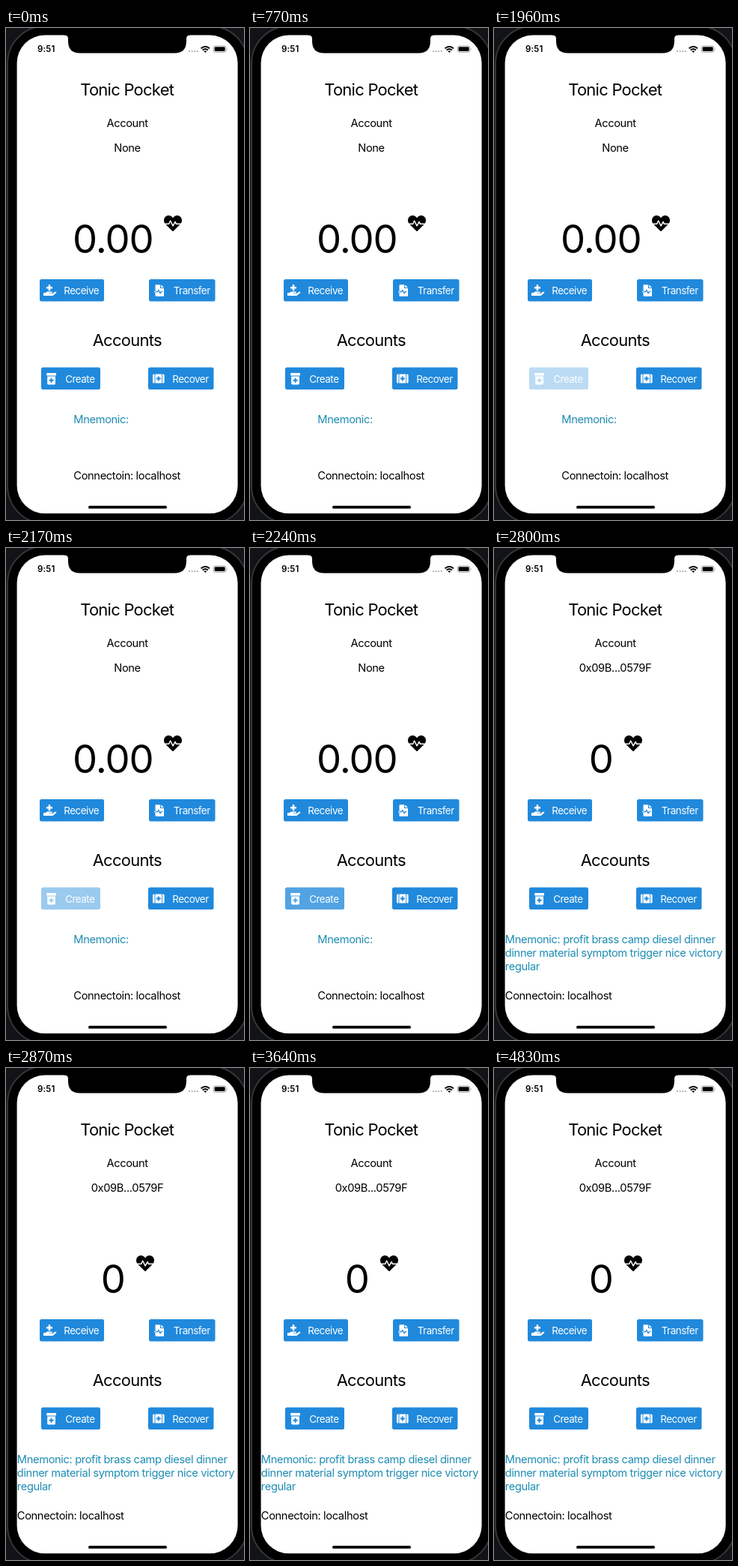
Animation, 318 px wide and 656 px high, one loop 5180 ms. Source, as an HTML page:

```html
<!DOCTYPE html>
<html lang="en">
<head>
<meta charset="utf-8">
<title>Wallet</title>
<style>
  html, body { margin: 0; width: 100%; height: 100%; overflow: hidden; background: #121316; }
  svg { display: block; width: 100%; height: 100%; }
  text { font: 14.7px Inter, Roboto, sans-serif; letter-spacing: -.026em; }
  .mid { text-anchor: middle; }
  .head { font-size: 22px; letter-spacing: -.034em; }
  .amount { font-size: 52.5px; letter-spacing: -.02em; }
  .clock { font-size: 11.5px; font-weight: 600; letter-spacing: .015em; }
  .label { font-size: 13.4px; letter-spacing: -.035em; fill: #fff; }
  .words { fill: #1e8db3; }
  .blue { fill: #2089dc; }
  .icon { fill: #fff; }
  .line { fill: none; stroke-linejoin: round; }
</style>
</head>
<body>
<svg viewBox="0 0 318 656">
  <defs>
    <path id="cross" d="M-1.3-4h2.6v2.7H4v2.6H1.3V4h-2.6V1.3H-4v-2.6h2.7z"/>
  </defs>

  <!-- phone -->
  <rect x="2" y="-2.5" width="321" height="663" rx="50" stroke="#353639" stroke-width="2"/>
  <rect x="14.6" y="9.6" width="295" height="637.6" rx="37" fill="#fff"/>
  <path d="M78 9v.6q5 0 5 5v3q0 16 16 16h126q16 0 16-16v-3q0-5 5-5v-.6z"/>
  <rect x="110" y="637" width="105" height="3.8" rx="1.9"/>

  <!-- status bar -->
  <text class="clock" x="42" y="32">9:51</text>
  <path d="M244 31h13" stroke="#b5b5b5" stroke-width="2" stroke-dasharray="2 1.6"/>
  <g class="line" stroke="#000" stroke-width="1.9">
    <path d="M260.6 27.2q5.7-5 11.4 0M262.7 29.5q3.6-3 7.2 0"/>
  </g>
  <path d="M264.4 31q1.9-1.4 3.8 0l-1.9 1.9z"/>
  <rect x="277.3" y="24" width="16.6" height="8.4" rx="2.4" fill="none" stroke="#999" stroke-width=".9"/>
  <rect x="278.6" y="25.3" width="14" height="5.8" rx="1.3"/>
  <path d="M295 26.8q1.6 1.4 0 2.8z" fill="#999"/>

  <!-- account -->
  <text class="mid head" x="161.7" y="89.6">Tonic Pocket</text>
  <text class="mid" x="162" y="132">Account</text>
  <text class="mid" x="162" y="165" id="address"></text>
  <text class="mid amount" x="142.8" y="300" id="amount"></text>
  <g id="heart">
    <path d="M-.6 10.2L-10.2.8C-12.6-2-12.6-6.1-10.2-8.5C-7.8-11-3.8-11-1.3-8.7L0-7.3L1.3-8.7C3.8-11 7.8-11 10.2-8.5C12.6-6.1 12.6-2 10.2.8L.6 10.2Q0 10.7-.6 10.2Z"/>
    <path class="line" d="M-12 .8h6.7l1.9-4.3L.1 3.3l2.9-5.4L4.5.8H12" stroke="#fff" stroke-width="1.5"/>
  </g>

  <!-- buttons -->
  <g>
    <rect class="blue" x="45" y="335" width="86" height="29.4" rx="2.5"/>
    <g class="icon">
      <use href="#cross" x="58" y="346.3"/>
      <path d="M50 353h2.8l2.2-1.6h6q1 0 1 1t-1 1h-3.4v.7h4.8l3-2.3q1.6-.7 2 .6-.1.6-.6 1l-3.8 3.1q-.6.5-1.3.5H50z"/>
    </g>
    <text class="label" x="77.3" y="355">Receive</text>
  </g>
  <g>
    <rect class="blue" x="191" y="335" width="88.5" height="29.4" rx="2.5"/>
    <path class="icon" d="M200.5 342.3h5.5v4.7h5v9.8q0 1-1 1h-9.5q-1 0-1-1v-13.5q0-1 1-1zM207 342.3l4 3.8h-4zM198 351h2v1.3h-2z"/>
    <path class="line" d="M199.6 351.6h3l1.4-2.2 2.1 4.6 1.3-2.4h2" stroke="#2089dc" stroke-width="1.2"/>
    <text class="label" x="223.7" y="355">Transfer</text>
  </g>

  <text class="mid head" x="161.7" y="424">Accounts</text>

  <g id="create">
    <rect class="blue" x="47" y="452.6" width="79" height="29.4" rx="2.5"/>
    <path class="icon" d="M54.8 460h11.6q.6 0 .6.6v2.4q0 .6-.6.6H54.8q-.6 0-.6-.6v-2.4q0-.6.6-.6zM55.2 464.6H66v9.5q0 1.4-1.4 1.4h-8q-1.4 0-1.4-1.4z"/>
    <use class="blue" href="#cross" transform="translate(60.6 469.8) scale(.75)"/>
    <text class="label" x="79.2" y="472.5">Create</text>
  </g>
  <g>
    <rect class="blue" x="190" y="452.6" width="87.5" height="29.4" rx="2.5"/>
    <path class="icon" d="M198.5 461.5v12h-1q-1.5 0-1.5-1.5v-9q0-1.5 1.5-1.5zM199.4 461.5h8.8v12h-8.8zM209.1 461.5h1q1.5 0 1.5 1.5v9q0 1.5-1.5 1.5h-1z"/>
    <use class="blue" href="#cross" transform="translate(203.8 467.5) scale(.75)"/>
    <text class="label" x="222.3" y="472.5">Recover</text>
  </g>

  <!-- footer -->
  <g class="words" id="words">
    <text y="527"></text>
    <text y="545"></text>
    <text y="563"></text>
  </g>
  <text y="602" id="server">Connectoin: localhost</text>
</svg>
<script>
  const LOOP = 5180, STEP = 70, PRESS = 1960, RELEASE = 2090, FADE = 250, READY = 2800, DIM = .3;
  const get = id => document.getElementById(id);
  const lines = [...get('words').children];
  const easeInOut = p => p < .5 ? 2 * p * p : 1 - 2 * (1 - p) ** 2;

  const empty = { address: 'None', amount: '0.00', heart: 223, left: 90.3, words: ['Mnemonic:', '', ''] };
  const filled = {
    address: '0x09B...0579F', amount: '0', heart: 186, left: 14.8,
    words: [
      'Mnemonic: profit brass camp diesel dinner',
      'dinner material symptom trigger nice victory',
      'regular'
    ]
  };
  let shown;

  function show(state) {
    if (state === shown) return;
    shown = state;
    get('address').textContent = state.address;
    get('amount').textContent = state.amount;
    get('heart').setAttribute('transform', `translate(${state.heart} 260.5)`);
    get('server').setAttribute('x', state.left);
    lines.forEach((line, i) => {
      line.textContent = state.words[i];
      line.setAttribute('x', state.left);
    });
  }

  function createOpacity(t) {
    if (t < PRESS) return 1;
    const p = Math.min(1, Math.max(0, (t - RELEASE) / FADE));
    return DIM + (1 - DIM) * easeInOut(p);
  }

  function draw() {
    const t = Math.floor(performance.now() % LOOP / STEP) * STEP;
    show(t < READY ? empty : filled);
    get('create').setAttribute('opacity', createOpacity(t));
    requestAnimationFrame(draw);
  }
  draw();
</script>
</body>
</html>
```
